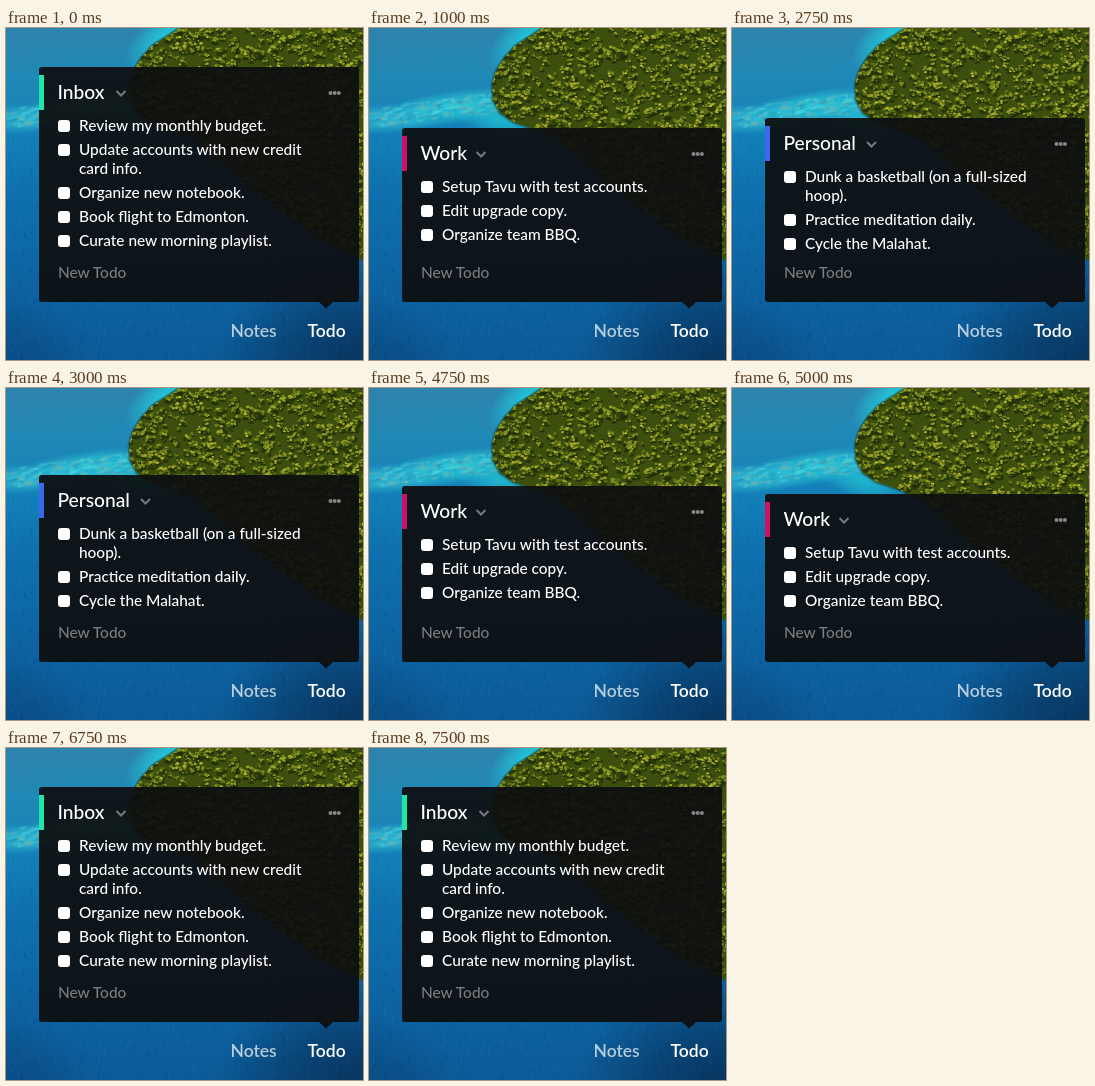
An HTML page with a canvas that plays this animation: 357 by 332 pixels, repeating every 8 s.

```html
<!DOCTYPE html>
<html lang="en">
<head>
<meta charset="utf-8">
<title>Todo panel</title>
<style>
  html, body { margin: 0; width: 100%; height: 100%; overflow: hidden; background: #0d5c99; }
  canvas, svg { position: absolute; left: 0; top: 0; width: 357px; height: 332px; }
  text { font-family: Lato, "Open Sans", sans-serif; font-size: 15.4px; font-weight: 500; fill: #fff; }
  .title { font-size: 19.2px; }
  .hint { fill: #7b7c7d; }
  .tab { font-size: 17.5px; font-weight: 600; }
</style>
</head>
<body>
<canvas id="sea" width="357" height="332"></canvas>
<svg viewBox="0 0 357 332">
  <path id="panel" fill="#0d0e10" fill-opacity=".93"/>
  <g id="lists"></g>
  <g id="dots" fill="#858687">
    <circle cx="324.5" cy="26" r="2"/><circle cx="328.7" cy="26" r="2"/><circle cx="332.9" cy="26" r="2"/>
  </g>
  <text class="hint" x="52" y="250">New Todo</text>
  <text class="tab" x="224.5" y="309" fill-opacity=".7">Notes</text>
  <text class="tab" x="301.5" y="309">Todo</text>
</svg>
<script>
const W = 357, H = 332, LOOP = 8000;

const lists = {
  inbox: { title: 'Inbox', color: '#1fe5a5', arrow: 115, items: [
    ['Review my monthly budget.'],
    ['Update accounts with new credit', 'card info.'],
    ['Organize new notebook.'],
    ['Book flight to Edmonton.'],
    ['Curate new morning playlist.']] },
  work: { title: 'Work', color: '#cd1262', arrow: 112, items: [
    ['Setup Tavu with test accounts.'],
    ['Edit upgrade copy.'],
    ['Organize team BBQ.']] },
  personal: { title: 'Personal', color: '#3c68ea', arrow: 139.5, items: [
    ['Dunk a basketball (on a full-sized', 'hoop).'],
    ['Practice meditation daily.'],
    ['Cycle the Malahat.']] }
};

// start time, visible list, panel top
const steps = [
  [0, 'inbox', 39],
  [1000, 'work', 100], [1250, 'work', 106],
  [2750, 'personal', 90], [3000, 'personal', 87],
  [4750, 'work', 98], [5000, 'work', 106],
  [6500, 'inbox', 41], [6750, 'inbox', 39]
];

const byId = id => document.getElementById(id);

function add(parent, tag, attrs, text) {
  const el = document.createElementNS('http://www.w3.org/2000/svg', tag);
  for (const k in attrs) el.setAttribute(k, attrs[k]);
  if (text) el.textContent = text;
  parent.appendChild(el);
  return el;
}

function buildList({ title, color, arrow, items }) {
  const g = add(byId('lists'), 'g', {});
  add(g, 'rect', { x: 33, y: 8, width: 5, height: 35, fill: color });
  add(g, 'text', { x: 51.5, y: 32, class: 'title' }, title);
  add(g, 'path', { d: `M${arrow - 4.5} 24l4.5 4.5l4.5 -4.5`, fill: 'none', stroke: '#77797b', 'stroke-width': 2 });
  let y = 64;
  for (const lines of items) {
    add(g, 'rect', { x: 52, y: y - 11, width: 12, height: 12, rx: 3, fill: '#fff' });
    lines.forEach((line, i) => add(g, 'text', { x: 73, y: y + i * 19 }, line));
    y += lines.length * 19 + 5;
  }
  return g;
}

function paintSea() {
  const c = byId('sea').getContext('2d');
  let seed = 17;
  const rnd = () => {
    seed = (seed + 0x6d2b79f5) | 0;
    let n = Math.imul(seed ^ (seed >>> 15), seed | 1);
    n ^= n + Math.imul(n ^ (n >>> 7), n | 61);
    return ((n ^ (n >>> 14)) >>> 0) / 4294967296;
  };
  const pick = a => a[Math.floor(rnd() * a.length)];

  const water = c.createLinearGradient(0, 0, 15, H);
  [[0, '#2f83ad'], [.15, '#2089b5'], [.33, '#1280b8'], [.5, '#0e70ae'], [.75, '#0d64a3'], [1, '#0c5b98']]
    .forEach(([at, color]) => water.addColorStop(at, color));
  c.fillStyle = water;
  c.fillRect(0, 0, W, H);

  const glow = (x, y, rx, ry, turn, rgb, alpha) => {
    c.save();
    c.translate(x, y);
    c.rotate(turn);
    c.scale(rx, ry);
    const g = c.createRadialGradient(0, 0, 0, 0, 0, 1);
    g.addColorStop(0, `rgba(${rgb},${alpha})`);
    g.addColorStop(.5, `rgba(${rgb},${alpha * .6})`);
    g.addColorStop(1, `rgba(${rgb},0)`);
    c.fillStyle = g;
    c.fillRect(-1, -1, 2, 2);
    c.restore();
  };
  glow(357, 345, 150, 120, 0, '6,38,72', .75);
  glow(0, 345, 90, 80, 0, '8,60,110', .5);
  glow(160, 8, 50, 24, -.7, '35,200,218', .95);
  glow(80, 80, 85, 17, -.15, '45,212,224', .9);
  glow(10, 91, 60, 15, 0, '55,200,218', .7);
  glow(128, 91, 50, 20, .35, '35,195,210', .8);

  // Reef flecks and small waves
  for (let i = 0; i < 160; i++) {
    const x = rnd() * 125;
    glow(x, 90 - x * .12 + (rnd() - .5) * 20, 2 + rnd() * 6, 1 + rnd() * 2, -.2,
      pick(['95,220,225', '135,180,170', '25,140,180']), .4);
  }
  for (let i = 0; i < 900; i++) {
    c.fillStyle = rnd() < .5 ? 'rgba(70,160,210,.12)' : 'rgba(0,35,85,.13)';
    c.fillRect(rnd() * W, 105 + rnd() * 227, 1, 2 + rnd() * 5);
  }

  const coast = [[174, 0], [158, 10], [146, 18], [135, 30], [127, 43], [123, 57], [124, 72], [131, 85],
    [144, 94], [168, 102], [194, 115], [221, 139], [252, 165], [291, 194], [324, 217], [357, 232], [357, 0]];
  const island = new Path2D();
  coast.forEach(([x, y], i) => i ? island.lineTo(x, y) : island.moveTo(x, y));
  island.closePath();

  c.lineJoin = 'round';
  c.lineWidth = 3;
  c.strokeStyle = 'rgba(24,70,65,.5)';
  c.stroke(island);
  c.fillStyle = '#3d4f0e';
  c.fill(island);
  c.save();
  c.clip(island);
  const dot = (x, y, r, color) => {
    c.fillStyle = color;
    c.beginPath();
    c.ellipse(x, y, r, r * .75, 0, 0, 7);
    c.fill();
  };
  // Each tree crown is a shadow with a cluster of lit leaves
  for (let i = 0; i < 1500; i++) {
    const x = 120 + rnd() * 240, y = rnd() * 240, r = 1.5 + rnd() * 3;
    dot(x + 1, y + 2, r, 'rgba(30,44,8,.65)');
    for (let k = 0; k < 5; k++) {
      dot(x + (rnd() - .5) * r * 1.9, y + (rnd() - .6) * r * 1.4, r * .4,
        pick(['#66781a', '#7f8d1f', '#96a026', '#adb030', '#58700f']));
    }
  }
  c.restore();
}

paintSea();
const groups = {};
for (const name in lists) groups[name] = buildList(lists[name]);

function draw(now) {
  const t = now % LOOP;
  const [, name, top] = steps.filter(s => s[0] <= t).pop();
  byId('panel').setAttribute('d',
    `M36 ${top}H350q3 0 3 3V271q0 3 -3 3H327l-7 6.5l-7 -6.5H36q-3 0 -3 -3V${top + 3}q0 -3 3 -3z`);
  for (const key in groups) {
    groups[key].style.display = key === name ? '' : 'none';
    groups[key].setAttribute('transform', `translate(0 ${top})`);
  }
  byId('dots').setAttribute('transform', `translate(0 ${top})`);
}

const start = performance.now();
function tick() {
  draw(performance.now() - start);
  requestAnimationFrame(tick);
}
tick();
</script>
</body>
</html>
```
